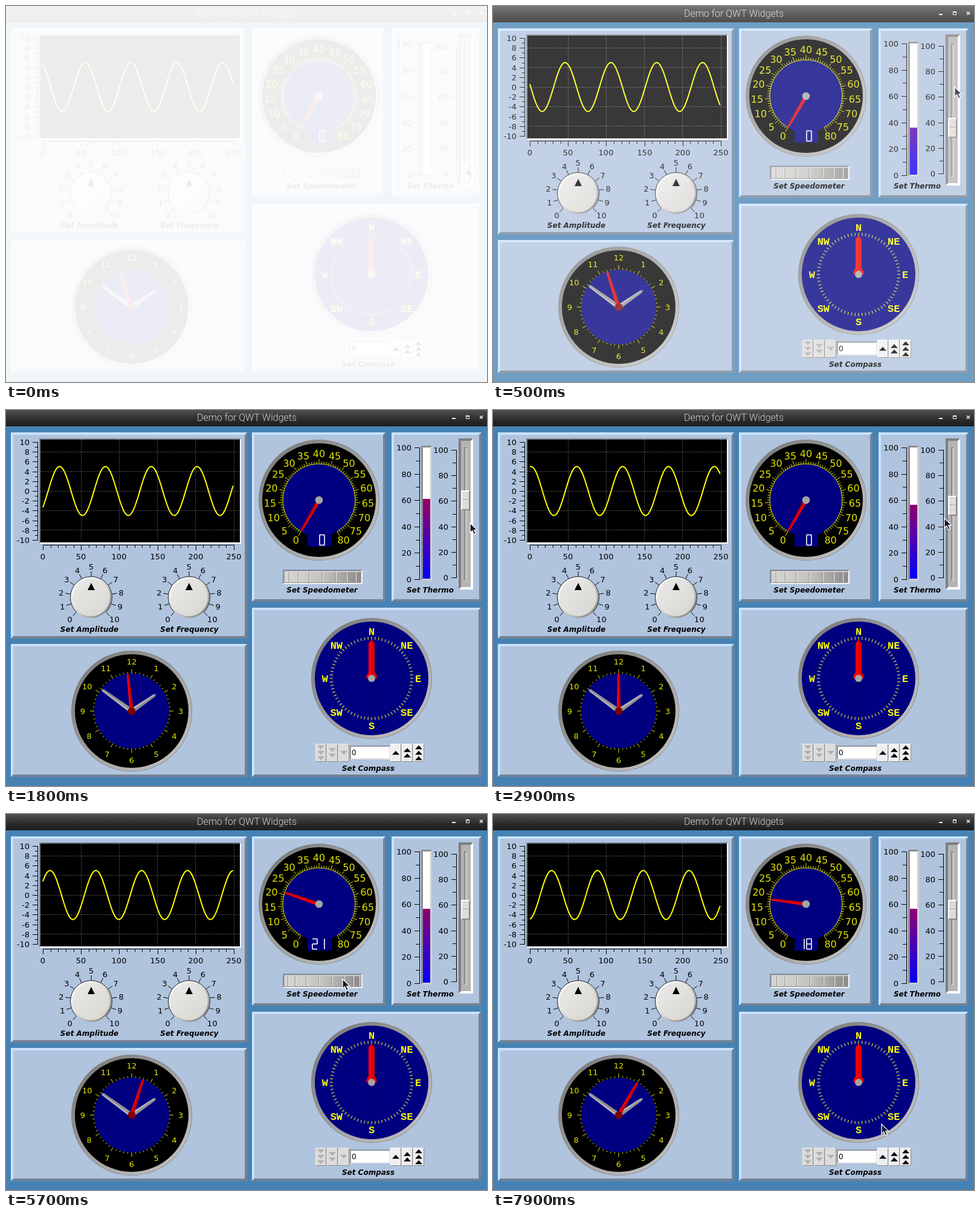
An HTML page with a canvas for the animation above (8 s loop, 796 by 622 pixels).

```html
<!DOCTYPE html>
<html lang="en">
<head>
<meta charset="utf-8">
<title>Demo for QWT Widgets</title>
<style>
html, body { margin: 0; width: 100%; height: 100%; overflow: hidden; background: #fff; }
canvas { display: block; }
</style>
</head>
<body>
<canvas id="stage" width="796" height="622"></canvas>
<script>
const g = document.getElementById('stage').getContext('2d');
const LOOP = 8000, RAD = Math.PI / 180;
const YELLOW = '#e2e200', NAVY = '#000080';
const SANS = '"DejaVu Sans", sans-serif';

// Key poses: [time, ...values], linear in between.
const LEVEL = [[0, 0], [900, 65], [1800, 61], [2200, 56.5]];
const SPEED = [[4300, 0], [5200, 26], [5700, 21], [6800, 4], [7500, 18]];
const POINTER = [[0, 762, 267], [500, 764, 134], [1800, 768, 187], [2800, 771, 170], [4000, 481, 279],
  [5200, 575, 274], [5700, 557, 273], [6800, 517, 280], [7500, 576, 278], [7900, 643, 513]];

function at(keys, t) {
  const i = keys.findIndex(k => k[0] > t);
  if (i === 0) return keys[0].slice(1);
  if (i < 0) return keys[keys.length - 1].slice(1);
  const a = keys[i - 1], b = keys[i], p = (t - a[0]) / (b[0] - a[0]);
  return a.slice(1).map((v, n) => v + (b[n + 1] - v) * p);
}

function rect(x, y, w, h, color) {
  g.fillStyle = color;
  g.fillRect(x, y, w, h);
}

function poly(points, color) {
  g.fillStyle = color;
  g.beginPath();
  points.forEach(p => g.lineTo(p[0], p[1]));
  g.closePath();
  g.fill();
}

function disc(x, y, r, color) {
  g.fillStyle = color;
  g.beginPath();
  g.arc(x, y, r, 0, 7);
  g.fill();
}

function line(x1, y1, x2, y2, color, width = 1) {
  g.strokeStyle = color;
  g.lineWidth = width;
  g.beginPath();
  g.moveTo(x1, y1);
  g.lineTo(x2, y2);
  g.stroke();
}

// Arc between two clockwise angles from straight up.
function arc(x, y, r, from, to, color) {
  g.strokeStyle = color;
  g.lineWidth = 1;
  g.beginPath();
  g.arc(x, y, r, (from - 90) * RAD, (to - 90) * RAD);
  g.stroke();
}

function gradient(x1, y1, x2, y2, ...colors) {
  const fill = g.createLinearGradient(x1, y1, x2, y2);
  colors.forEach((c, i) => fill.addColorStop(i / (colors.length - 1), c));
  return fill;
}

const diagonal = (x, y, r, ...colors) => gradient(x - r, y - r, x + r, y + r, ...colors);

// Text is centred vertically on the height of its capitals.
function text(s, x, y, color = '#000', size = 13, align = 'center', style = '', family = SANS) {
  g.font = `${style} ${size}px ${family}`;
  g.textAlign = align;
  g.fillStyle = color;
  g.fillText(s, x, Math.round(y + size * 0.365));
}

const caption = (s, x, y) => text(s, x, y, '#000', 12, 'center', 'italic bold');

function bevel(x, y, w, h, b, light, dark, fill) {
  rect(x, y, w, h, light);
  poly([[x + w, y], [x + w, y + h], [x, y + h], [x + b, y + h - b], [x + w - b, y + h - b], [x + w - b, y + b]], dark);
  rect(x + b, y + b, w - 2 * b, h - 2 * b, fill);
}

const panel = (x, y, w, h) => bevel(x, y, w, h, 4, '#c8e2ff', '#758294', '#b0c4de');

function radial(x, y, r1, r2, deg, color, width = 1) {
  const s = Math.sin(deg * RAD), c = -Math.cos(deg * RAD);
  line(x + r1 * s, y + r1 * c, x + r2 * s, y + r2 * c, color, width);
}

// Keeps the label outside radius r, whatever its width.
function roundLabel(s, x, y, r, deg, color, size, style = '', family = SANS) {
  g.font = `${style} ${size}px ${family}`;
  const rx = r + g.measureText(s).width / 2, ry = r + size * 0.365;
  text(s, x + rx * Math.sin(deg * RAD), y - ry * Math.cos(deg * RAD), color, size, 'center', style, family);
}

function dial(x, y, face) {
  disc(x, y, 100, '#808080');
  disc(x, y, 99.3, diagonal(x, y, 70, '#808080', '#a0a0a0', '#bcbcbc'));
  disc(x, y, 94, face);
}

function hand(x, y, deg, length, half, light, dark) {
  g.save();
  g.translate(x, y);
  g.rotate(deg * RAD);
  const side = k => [[0, 0], [k * half, -half], [k * half * .6, half - length], [0, -length]];
  poly(side(1), dark);
  poly(side(-1), light);
  g.restore();
}

function titleBar() {
  rect(0, 0, 796, 27, gradient(0, 0, 0, 27, '#505050', '#3c3c3c', '#282828', '#1c1c1c'));
  text('Demo for QWT Widgets', 398.5, 12, '#d0d0d0', 16, 'center', '300', 'Roboto, sans-serif');
  rect(738, 13, 6, 2, '#eee');
  g.strokeStyle = '#eee';
  g.lineWidth = 1;
  g.strokeRect(761.5, 10.5, 5, 4);
  rect(761, 9, 6, 2, '#eee');
  line(784, 9.5, 789, 14.5, '#eee', 1.6);
  line(789, 9.5, 784, 14.5, '#eee', 1.6);
}

function plot(peak) {
  const px = v => 61 + v * 1.264, py = v => 134 - v * 8.1;
  bevel(55, 47, 334, 174, 2, '#77828f', '#fff', '#000');
  g.setLineDash([1, 2]);
  for (let v = 50; v <= 250; v += 50) line(Math.floor(px(v)) + .5, 49, Math.floor(px(v)) + .5, 219, '#8c8c90');
  for (let v = -8; v <= 8; v += 4) line(57, Math.floor(py(v)) + .5, 387, Math.floor(py(v)) + .5, '#8c8c90');
  g.setLineDash([]);

  rect(52, 53, 1, 163, '#000');
  for (let v = -10; v <= 10; v++) {
    const major = v % 2 === 0, y = Math.round(py(v));
    rect(major ? 44 : 48, y, major ? 8 : 4, 1, '#000');
    if (major) text(v, 39, y, '#000', 13, 'right');
  }
  rect(61, 223, 317, 1, '#000');
  for (let v = 0; v <= 250; v += 10) {
    const major = v % 50 === 0, x = Math.round(px(v));
    rect(x, 223, 1, major ? 9 : 5, '#000');
    if (major) text(v, x, 242);
  }

  g.strokeStyle = '#ffff00';
  g.lineWidth = 2;
  g.beginPath();
  for (let v = 0; v < 250; v++) g.lineTo(px(v), py(5 * Math.cos((v - peak) * Math.PI / 30)));
  g.stroke();
}

function knob(x, y, name, nameX) {
  disc(x, y, 34, diagonal(x, y, 24, '#ffffff', '#d8d6d4', '#8c8a88'));
  disc(x, y, 31, diagonal(x, y, 22, '#e9e7e5', '#e2e0dd', '#dad8d5'));
  arc(x, y, 34.5, -135, 135, '#202830');
  for (let v = 0; v <= 10; v++) {
    const a = v * 27 - 135;
    radial(x, y, 35, 43, a, '#000');
    roundLabel(v, x, y, 46, a, '#000', 13);
  }
  poly([[x, y - 24], [x + 6, y - 12], [x - 6, y - 12]], '#000');
  caption(name, nameX, 363);
}

// Seven segments: 0 to 5 run clockwise from the top, 6 is the middle bar.
const DIGITS = ['012345', '12', '01346', '01236', '1256', '02356', '023456', '012', '0123456', '012356'];

// The six corners of a digit are a hexagon squared off by signs.
function lcdCorner(i) {
  const a = (i * 60 - 30) * RAD;
  return [4 + 4 * Math.sign(Math.sin(a)), 8.5 - 8.5 * Math.sign(Math.round(Math.cos(a)))];
}

function lcd(value, right, y) {
  [...String(value)].reverse().forEach((digit, i) => {
    const x = right - 8 - i * 12;
    for (const s of DIGITS[digit]) {
      const [x1, y1] = lcdCorner(s === '6' ? 5 : +s), [x2, y2] = lcdCorner(s === '6' ? 2 : +s + 1);
      line(x + x1, y + y1, x + x2, y + y2, '#e6e6f0', 1.8);
    }
  });
}

function speedometer(x, y, speed) {
  const angle = v => v * 3.75 - 150;
  dial(x, y, '#000');
  disc(x, y, 60, NAVY);
  rect(x - 19, y + 55, 39, 22, NAVY);
  arc(x, y, 60, -150, 150, YELLOW);
  for (let v = 0; v <= 80; v++) {
    const major = v % 5 === 0;
    radial(x, y, 60, major ? 68 : 64, angle(v), YELLOW);
    if (major) roundLabel(v, x, y, 71, angle(v), YELLOW, 16);
  }
  lcd(Math.round(speed), x + 9, y + 57.5);
  hand(x, y, angle(speed), 60, 3, '#ff0000', '#d00000');
  disc(x, y, 6.3, '#a4a4a4');
  wheel(speed * 4.5);
  caption('Set Speedometer', 523, 298);
}

// A ribbed cylinder seen from the side.
function wheel(turn) {
  bevel(458, 264, 132, 24, 2, '#8490a0', '#f4f4f4', '#aaa');
  rect(461, 267, 126, 19, gradient(461, 0, 587, 0, '#d6d4d0', '#d0cecb', '#c4c2bf', '#aaa8a5', '#8c8a88'));
  rect(461, 267, 126, 1, '#e6e4e2');
  rect(461, 285, 126, 1, '#8c8a88');
  for (let a = turn % 20 - 80; a < 75; a += 20) {
    if (a < -75) continue;
    const x = Math.round(524 + 63 * Math.sin(a * RAD));
    rect(x - 1, 268, 1, 17, '#8e8c8a');
    rect(x, 268, 1, 17, '#f2f0ee');
  }
}

function scale(x, bottom, top, labelX) {
  rect(x, top, 1, bottom - top + 1, '#000');
  for (let v = 0; v <= 100; v += 10) {
    const y = Math.round(bottom - (bottom - top) * v / 100), major = v % 20 === 0;
    rect(x - (major ? 8 : 6), y, major ? 8 : 6, 1, '#000');
    if (major) text(v, labelX, y, '#000', 13, 'right');
  }
}

function thermo(level) {
  scale(684, 280, 62, 671);
  bevel(687, 59, 18, 223, 3, '#8c8c90', '#cfcfcf', '#fff');
  const top = 280 - 2.18 * level;
  rect(690, top, 12, 279 - top, gradient(0, 280, 0, 62, '#0000ff', '#ff0000'));

  scale(745, 277, 66, 732);
  bevel(749, 47, 24, 250, 4, '#7e7e7e', '#fff', '#b4b4b4');
  bevel(758, 62, 5, 221, 1, '#6a6a6a', '#dedede', '#b4b4b4');
  const mid = Math.round(277 - 2.1 * level);
  bevel(753, mid - 16, 15, 33, 2, '#fff', '#8a8a8a', '#dedcda');
  rect(756, mid - 1, 9, 1, '#8a8a8a');
  rect(756, mid, 9, 1, '#fff');
  caption('Set Thermo', 702, 298);
}

function clock(x, y, seconds) {
  dial(x, y, '#000');
  disc(x, y, 62, NAVY);
  for (let m = 1; m <= 60; m++) {
    const major = m % 5 === 0;
    radial(x, y, 62, major ? 69 : 64.5, m * 6, YELLOW);
    if (major) roundLabel(m / 5, x, y, 77, m * 6, YELLOW, 13);
  }
  hand(x, y, 55.5, 49, 3.8, '#b4b4b4', '#929292');
  hand(x, y, -54, 62, 3.8, '#b4b4b4', '#929292');
  hand(x, y, seconds * 6, 63, 3.2, '#ff0000', '#c80000');
  disc(x, y, 6.3, '#800000');
}

function compass(x, y) {
  dial(x, y, NAVY);
  for (let a = 0; a < 360; a += 5) radial(x, y, 64, 69, a, '#c8c840', 1.3);
  ['N', 'NE', 'E', 'SE', 'S', 'SW', 'W', 'NW'].forEach((s, i) =>
    roundLabel(s, x, y, 72, i * 45, '#ffff00', 17, 'bold', '"Liberation Mono", monospace'));
  rect(x - 1, y, 2, 64, '#000070');
  const side = k => [[x, y], [x + 9 * k, y], [x + 8 * k, y - 6], [x + 5 * k, y - 10], [x + 5 * k, y - 58], [x, y - 64]];
  poly(side(-1), '#ff0000');
  poly(side(1), '#e00000');
  disc(x, y, 6, '#a4a4a4');
}

function stepButton(x, count, up) {
  bevel(x, 552, 18, 30, 1, up ? '#fff' : '#e8e8e8', '#8c8c8c', up ? '#efefef' : '#dedcda');
  for (let i = 0; i < count; i++) {
    const y = 567 + (i - (count - 1) / 2) * 9, d = up ? -3.3 : 3.3;
    poly([[x + 3, y - d], [x + 15, y - d], [x + 9, y + d]], up ? '#000' : '#b0b0b0');
  }
}

function counter() {
  for (let n = 1; n <= 3; n++) {
    stepButton(569 - n * 19, n, false);
    stepButton(617 + n * 19, n, true);
  }
  bevel(569, 555, 67, 23, 2, '#8e959e', '#e4e4e4', '#fff');
  text('0', 572, 567, '#000', 12, 'left');
  caption('Set Compass', 599.5, 593);
}

function pointer(x, y) {
  g.save();
  g.translate(Math.round(x), Math.round(y));
  g.lineWidth = 1.3;
  g.strokeStyle = '#fff';
  poly([[0, 0], [0, 16], [3.7, 12.5], [6.5, 19], [9.5, 17.7], [6.7, 11.5], [11.5, 11.3]], '#141428');
  g.stroke();
  g.restore();
}

function draw(t) {
  rect(0, 0, 796, 622, '#4682b4');
  titleBar();
  panel(8, 37, 391, 341);
  plot(55.4 - 0.0186 * t);
  knob(141, 310, 'Set Amplitude', 138);
  knob(303, 310, 'Set Frequency', 303.5);
  panel(407, 37, 221, 280);
  speedometer(518, 149, at(SPEED, t)[0]);
  panel(638, 37, 149, 280);
  thermo(at(LEVEL, t)[0]);
  panel(8, 387, 391, 220);
  clock(208, 498, 57 + Math.floor((t + 320) / 1000));
  panel(407, 327, 379, 280);
  compass(605, 444);
  counter();
  pointer(...at(POINTER, t));
  const veil = 0.925 - 0.00141 * t;
  if (veil > 0) rect(0, 0, 796, 622, `rgba(255, 255, 255, ${veil})`);
}

const start = performance.now();
function tick() {
  const t = (performance.now() - start) % LOOP;
  draw(Math.floor(t / 100) * 100);
  requestAnimationFrame(tick);
}
tick();
</script>
</body>
</html>
```
